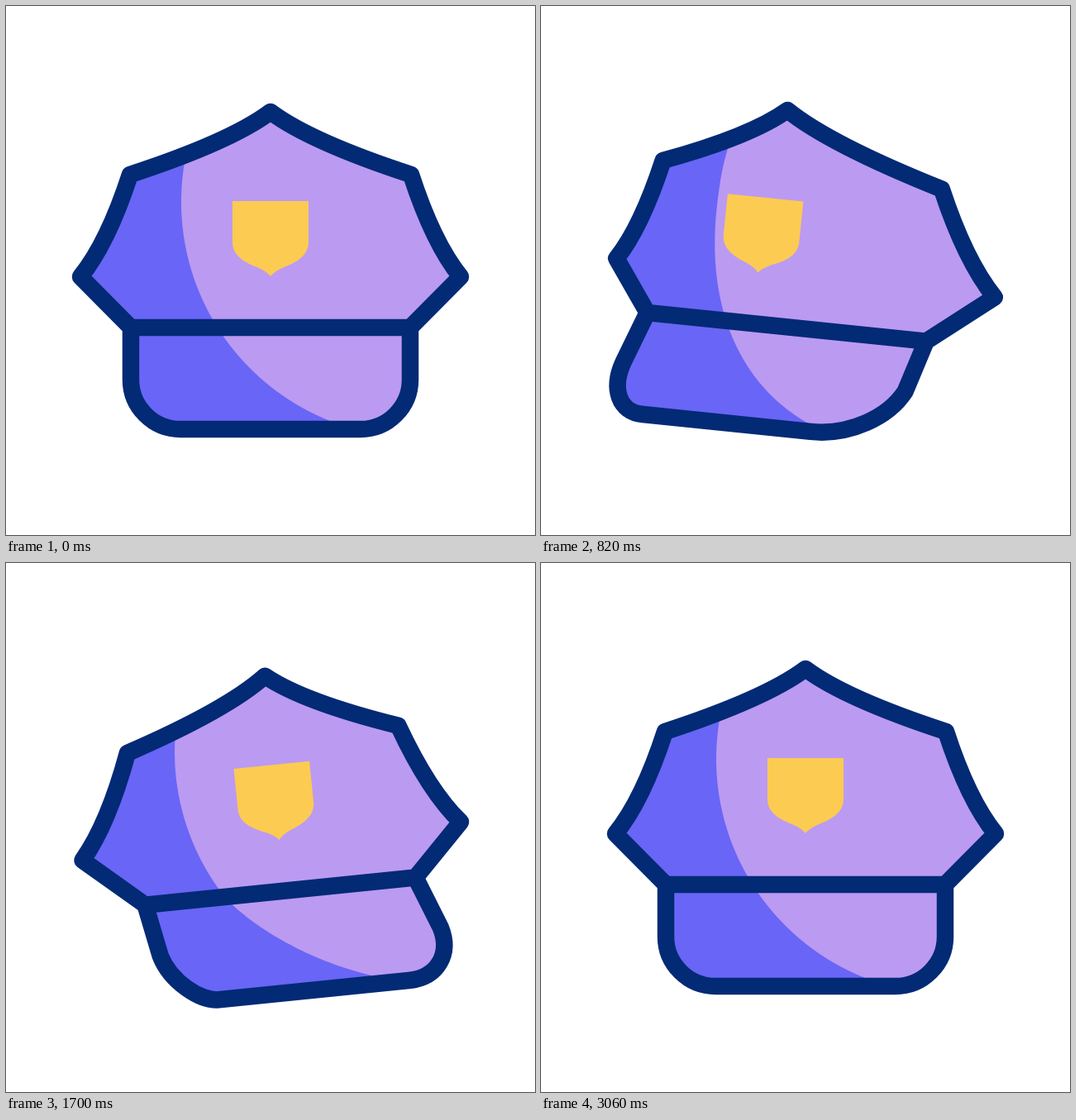
Write an HTML page with a canvas that moves like this. It is 640 by 640 pixels and loops after 3.6 s.

```html
<!DOCTYPE html>
<html>
<head>
<meta charset="utf-8">
<style>
  html, body { margin: 0; width: 100%; height: 100%; overflow: hidden; background: #fff; }
  canvas { display: block; }
</style>
</head>
<body>
<canvas id="stage" width="640" height="640"></canvas>
<script>
const ctx = document.getElementById('stage').getContext('2d');
const LOOP = 3600, NAVY = '#032a75', BLUE = '#6965f6', LILAC = '#bb9af2', GOLD = '#fccb52';

// Points around the pivot: x, y, shift when turned left, shift when turned right
const points = {
  top: [0, -200, -42.4, 25.4],
  topR: [48, -164, -35, 18],
  shoulderR: [170, -124, -17, 1.5],
  sideR: [197, -41, -7, 1.5],
  tipR: [230, -0.5, 0, 1.5],
  bandR: [169, 61, -16, 5],
  bandL: [-169, 61, -17, 16],
  tipL: [-230, -0.5, 0, 1.5],
  sideL: [-197, -41, -7, 6],
  shoulderL: [-170, -124, -16, 13.6],
  topL: [-48, -164, -35, 22],
  visorR: [169, 124, -35, 37],
  curveR1: [169, 157, -52, 52],
  curveR2: [142, 184, -69, 65],
  bottomR: [109, 184, -84, 66],
  bottomL: [-109, 184, -70, 48],
  curveL2: [-142, 184, -66, 60],
  curveL1: [-169, 157, -51, 48],
  visorL: [-169, 124, -40, 35],
  badge: [0, 0, -58, 25.6]
};

// Keys: time, value, and an optional warp of the ease leading to that key
const leftKeys = [[0, 0], [990, 1.078, 0.95], [2020, 0, 0.87]];
const rightKeys = [[0, 0], [990, 0], [2020, 1.07, 0.87], [3060, 0, 0.83]];
const shadeKeys = [[0, 0], [990, 1.07, 0.95], [2020, -1.07, 0.8], [3060, 0, 0.83]];
const tiltKeys = [[0, 0], [680, 6], [990, 5.7], [2020, -9.2], [3060, 0, 0.83]];
const dipKeys = [[0, 0], [120, 0], [550, 23.5], [885, -1], [1080, 0], [1500, 17], [1920, 0]];

function track(keys, t) {
  const i = keys.findIndex(k => k[0] > t);
  if (i < 0) return keys[keys.length - 1][1];
  const [t0, v0] = keys[i - 1], [t1, v1, warp = 1] = keys[i];
  const x = ((t - t0) / (t1 - t0)) ** warp;
  return v0 + (v1 - v0) * x * x * (3 - 2 * x);
}

function pose(t) {
  const l = track(leftKeys, t), r = track(rightKeys, t), p = {};
  for (const name in points) {
    const [x, y, left, right] = points[name];
    p[name] = [x + l * left + r * right, y];
  }
  return p;
}

function outline(p) {
  const cap = new Path2D();
  cap.moveTo(...p.top);
  cap.quadraticCurveTo(...p.topR, ...p.shoulderR);
  cap.quadraticCurveTo(...p.sideR, ...p.tipR);
  cap.lineTo(...p.bandR);
  cap.lineTo(...p.bandL);
  cap.lineTo(...p.tipL);
  cap.quadraticCurveTo(...p.sideL, ...p.shoulderL);
  cap.quadraticCurveTo(...p.topL, ...p.top);
  cap.closePath();
  cap.moveTo(...p.bandR);
  cap.lineTo(...p.visorR);
  cap.bezierCurveTo(...p.curveR1, ...p.curveR2, ...p.bottomR);
  cap.lineTo(...p.bottomL);
  cap.bezierCurveTo(...p.curveL2, ...p.curveL1, ...p.visorL);
  cap.lineTo(...p.bandL);
  cap.closePath();
  return cap;
}

// Lit area: right of a circle's edge that bends as the cap turns
function litArea(turn) {
  const area = new Path2D();
  area.moveTo(300, -210);
  for (let y = -210; y <= 190; y += 2) {
    const bend = turn > 0
      ? -7 - 45 * (Math.max(0, y + 100) / 274) ** 1.6
      : 3 + 45 * (Math.max(0, y - 61) / 113) ** 1.3;
    area.lineTo(177 - Math.sqrt(285 ** 2 - (y + 91) ** 2) + Math.abs(turn) * bend, y);
  }
  area.lineTo(300, 190);
  return area;
}

const badge = new Path2D('M-46-92H46V-42C46-21 20-14 12-10Q4-6 0-1Q-4-6-12-10C-20-14-46-21-46-42Z');

function draw(t) {
  const p = pose(t), cap = outline(p);

  ctx.setTransform(1, 0, 0, 1, 0, 0);
  ctx.fillStyle = '#fff';
  ctx.fillRect(0, 0, 640, 640);
  ctx.translate(320, 328 + track(dipKeys, t));
  ctx.rotate(track(tiltKeys, t) * Math.PI / 180);

  ctx.fillStyle = BLUE;
  ctx.fill(cap);
  ctx.save();
  ctx.clip(cap);
  ctx.fillStyle = LILAC;
  ctx.fill(litArea(track(shadeKeys, t)));
  ctx.restore();

  ctx.save();
  ctx.translate(...p.badge);
  ctx.fillStyle = GOLD;
  ctx.fill(badge);
  ctx.restore();

  ctx.strokeStyle = NAVY;
  ctx.lineWidth = 20.5;
  ctx.lineJoin = 'round';
  ctx.stroke(cap);
}

const start = performance.now();
function frame() {
  draw((performance.now() - start) % LOOP);
  requestAnimationFrame(frame);
}
frame();
</script>
</body>
</html>
```
